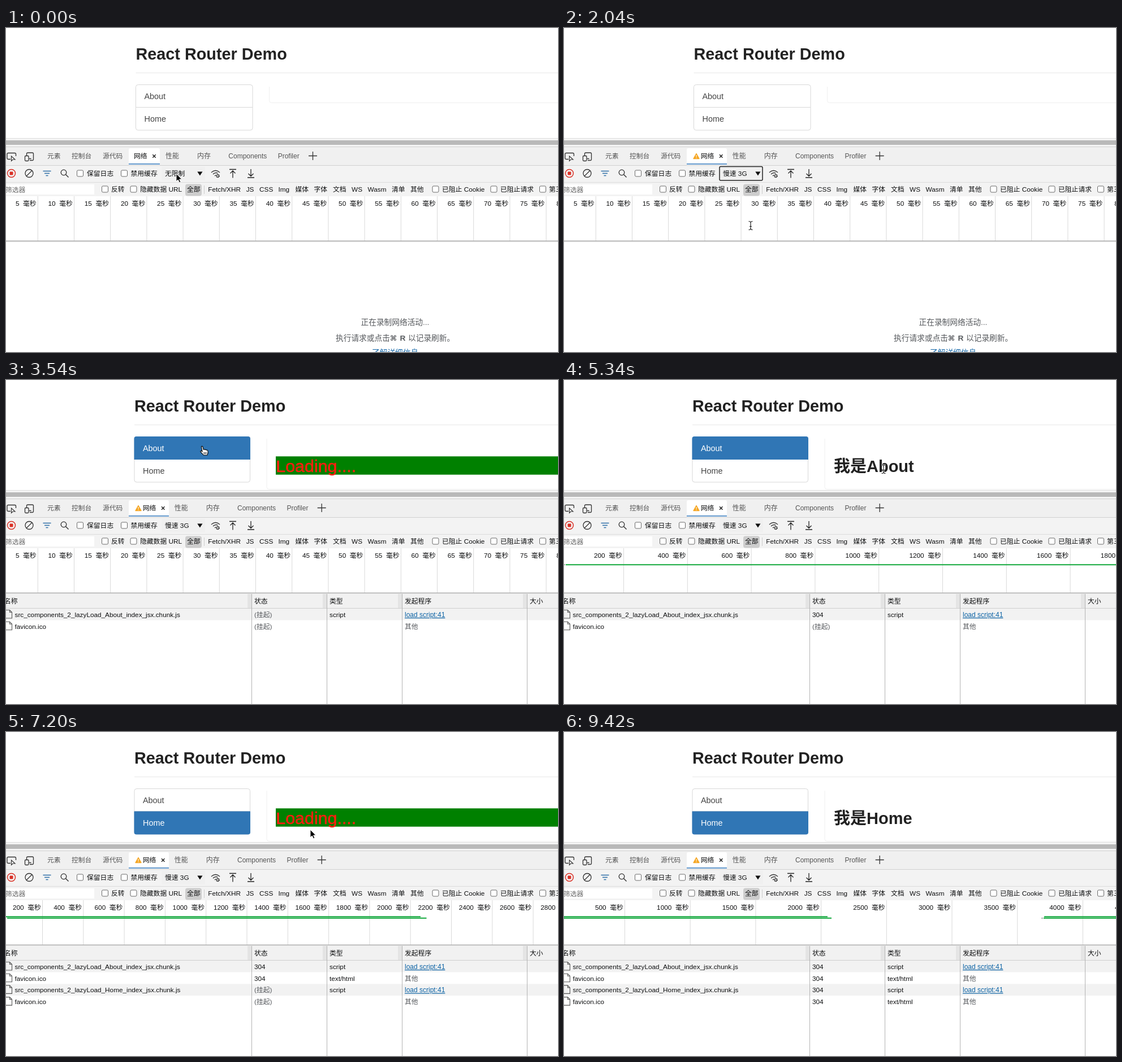
Animation, 976 px wide and 574 px high, one loop 9.48 s. Source, as an HTML page:

```html
<!DOCTYPE html>
<html lang="zh">
<head>
<meta charset="utf-8">
<title>React Router Demo</title>
<style>
html, body { margin: 0; width: 100%; height: 100%; overflow: hidden; background: #fff; }
svg { display: block; width: 976px; height: 574px; }
text { font-family: "Liberation Sans", "Noto Sans CJK SC", "Noto Sans CJK", sans-serif; white-space: pre; }
</style>
</head>
<body>
<svg id="stage" viewBox="0 0 976 574" xmlns="http://www.w3.org/2000/svg"></svg>
<script>
const LOOP = 9480, STEP = 60;
const T = {
  menu: 120, pick: 1680, about: 3060, aboutDone: 5100, icon1: 5400,
  home: 6780, icon2: 6840, homeDone: 8640, icon2Done: 8880
};
const stage = document.getElementById('stage');
const INK = '#0e0f10', GREY = '#55585c', BLUE = '#3076b5', GREEN = '#12a83c', FONT = 11.8;

function add(parent, tag, attrs, content) {
  const el = document.createElementNS('http://www.w3.org/2000/svg', tag);
  for (const k in attrs) el.setAttribute(k, attrs[k]);
  if (content !== undefined) el.textContent = content;
  parent.appendChild(el);
  return el;
}
const group = (parent = stage) => add(parent, 'g', {});
const rect = (p, x, y, width, height, fill, more) => add(p, 'rect', { x, y, width, height, fill, ...more });
const path = (p, d, stroke, w = 1, more) =>
  add(p, 'path', { d, stroke, 'stroke-width': w, fill: 'none', ...more });
const text = (p, x, y, s, size = FONT, fill = INK, more) =>
  add(p, 'text', { x, y, 'font-size': size, fill, ...more }, s);
const show = (el, on) => el.setAttribute('display', on ? 'inline' : 'none');
const BOLD = { 'font-weight': 700 };
const check = (p, x, y) => rect(p, x, y, 11, 11, '#fff', { rx: 2, stroke: '#6b6b6b' });

// Web page, in its plain and its slightly narrower layout
function page(x, w, panelX, panelEnd) {
  const g = group();
  text(g, x, 56, 'React Router Demo', 28.8, '#222', BOLD);
  path(g, `M${x} 79.5H976`, '#e8e8e8');
  path(g, `M${panelX} 104V${panelEnd - 4}q0 4 4 4H976`, '#efefef');
  rect(g, x, 100.5, w, 80.5, '#fff', { rx: 4, stroke: '#d8d8d8' });
  path(g, `M${x} 140.5h${w}`, '#d8d8d8');
  const r = x + w;
  const topShape = `M${x - .5} 141V104q0-4 4-4H${r - 3.5}q4 0 4 4V141z`;
  const lowShape = `M${x - .5} 140.5V177.5q0 4 4 4H${r - 3.5}q4 0 4-4V140.5z`;
  const hoverTop = path(g, topShape, '#d8d8d8', 1, { fill: '#f1f1f1' });
  const hoverLow = path(g, lowShape, '#d8d8d8', 1, { fill: '#f1f1f1' });
  const top = path(g, topShape, 'none', 0, { fill: BLUE });
  const low = path(g, lowShape, 'none', 0, { fill: BLUE });
  const a = text(g, x + 15, 126, 'About', 14.4);
  const h = text(g, x + 15, 166, 'Home', 14.4);
  return { g, top, low, a, h, hoverTop, hoverLow };
}
const before = page(229.5, 206.5, 465.5, 132.5);
const after = page(227, 204.5, 461, 193.5);

const loading = group();
rect(loading, 477, 135.3, 499, 32.4, '#008000');
text(loading, 477.3, 163, 'Loading....', 30.4, '#ff1d10', { stroke: '#ff1d10', 'stroke-width': .5 });
const aboutTitle = text(stage, 477, 163, '我是About', 29, '#222', BOLD);
const homeTitle = text(stage, 477, 163, '我是Home', 29, '#222', BOLD);

// Developer tools frame
const tools = group();
rect(tools, 0, 195, 976, 16, '#f4f4f4');
path(tools, 'M0 195.5H976', '#dedede');
rect(tools, 0, 199, 976, 8, '#b9b9b9');
rect(tools, 0, 210, 976, 33, '#f0f0f0');
path(tools, 'M0 210.5H976M0 243.5H976', '#d0d0d0');
rect(tools, 0, 244, 976, 54, '#f3f3f3');
path(tools, 'M0 273.5H976', '#dcdcdc');
path(tools, 'M8 232.5H4q-2 0-2-2V223.5q0-2 2-2H15.5q2 0 2 2V227', '#333', 1.3);
path(tools, 'M9.5 227v8.5l2.5-2.5h4z', '#333', 1.2, { fill: '#fff' });
path(tools, 'M36.5 226V223q0-2 2-2H46.5q2 0 2 2V233q0 1.5-1.5 1.5H42M41 231.5h3.5', '#333', 1.3);
rect(tools, 33.5, 226.5, 6.5, 9, '#f0f0f0', { rx: 1.5, stroke: '#333', 'stroke-width': 1.3 });
[[73, '元素'], [116, '控制台'], [171, '源代码']].forEach(([x, s]) => text(tools, x, 231, s, FONT, '#555'));

function tabs(width, warn) {
  const g = group(), dx = warn ? 15.7 : 0;
  path(g, `M217 243V216q0-3 3-3h${width - 6}q3 0 3 3V243z`, 'none', 0, { fill: '#fff' });
  rect(g, 217, 240.2, width, 1.5, '#2f76bb');
  if (warn) {
    path(g, 'M234 222.5L239 231.5H229z', '#f5a623', 1.4, { fill: '#f5a623', 'stroke-linejoin': 'round' });
    path(g, 'M234 225v3.5M234 229.5v1.2', '#fff', 1.1);
  }
  text(g, 226 + dx, 231, '网络', FONT, INK, { 'font-weight': 500 });
  path(g, `M${259.3 + dx} 224.3l5.4 5.4m0-5.4l-5.4 5.4`, '#222', 1.5);
  [[282, '性能'], [338, '内存'], [393.3, 'Components'], [480.7, 'Profiler']]
    .forEach(([x, s]) => text(g, x + dx, 231, s, FONT + .2, '#555'));
  path(g, `M${535 + dx} 226.5h15m-7.5-7.5v15`, '#333', 1.3);
  return g;
}
const plainTabs = tabs(55, false), warnTabs = tabs(71, true);

// Toolbar
const bar = group();
add(bar, 'circle', { cx: 9.5, cy: 257.5, r: 7, fill: 'none', stroke: '#d93025', 'stroke-width': 1.5 });
rect(bar, 6.5, 254.5, 6, 6, '#d93025', { rx: 1 });
add(bar, 'circle', { cx: 41, cy: 257.5, r: 7, fill: 'none', stroke: '#333', 'stroke-width': 1.3 });
path(bar, 'M36 262.5l10-10', '#333', 1.3);
path(bar, 'M65.5 253.5h14M68 257.5h9M70.5 261.5h4', '#2f6fa8', 1.4);
add(bar, 'circle', { cx: 102, cy: 256, r: 4.8, fill: 'none', stroke: '#333', 'stroke-width': 1.3 });
path(bar, 'M105.5 259.5l5 5', '#333', 1.4);
check(bar, 125.5, 252);
text(bar, 143, 262, '保留日志');
check(bar, 203.5, 252);
text(bar, 220.5, 262, '禁用缓存');
rect(bar, 275, 246, 77, 24, '#f0f0f0');
const focus = rect(bar, 275, 245.5, 76, 24.5, '#f0f0f0', { rx: 2, stroke: '#222', 'stroke-width': 1.5 });
const noLimit = text(bar, 281, 262, '无限制');
const slow = text(bar, 281, 262, '慢速 3G');
path(bar, 'M338.3 254.5h9.2l-4.6 7z', 'none', 0, { fill: '#111' });
path(bar, 'M363 256q7.5-7 15 0M366 259q4.5-4 8.5-1.5M369 262l2-1.5', '#333', 1.4);
add(bar, 'circle', { cx: 374.5, cy: 262, r: 2.3, fill: 'none', stroke: '#222', 'stroke-width': 2, 'stroke-dasharray': '1.6 .5' });
path(bar, 'M395 250.5h12M401 265.5V253m-4.5 4.5L401 253l4.5 4.5', '#222', 1.3);
path(bar, 'M427 265h12M433 250v12.5m-4.5-4.5l4.5 4.5l4.5-4.5', '#222', 1.3);

// Filter row
rect(bar, 0, 277, 156, 18, '#fff');
text(bar, -1, 290.5, '筛选器', FONT, '#6e6e6e');
[169.5, 220, 754, 857, 943.5].forEach(x => check(bar, x, 280));
rect(bar, 317, 276.5, 29, 21, '#cdcdcd', { rx: 4 });
path(bar, 'M350.5 279V294', '#ccc');
[[186, '反转'], [237, '隐藏数据 URL'], [320, '全部'], [357.3, 'Fetch/XHR'], [424.7, 'JS'], [448, 'CSS'],
 [481.5, 'Img'], [511.5, '媒体'], [544.5, '字体'], [578, '文档'], [611, 'WS'], [639.5, 'Wasm'], [682, '清单'],
 [715, '其他'], [771, '已阻止 Cookie'], [874, '已阻止请求'], [960, '第三方请求']]
  .forEach(([x, s]) => text(bar, x, 290, s));

// Timeline rulers
function ruler(first, gap, unit) {
  const g = group();
  rect(g, 0, 298, 976, 79, '#fff');
  for (let i = 1, x = first; x < 1040; i++, x += gap) {
    path(g, `M${x} 298V377`, '#d9d9d9');
    text(g, x - 2.7, 314.5, `${i * unit}\u00a0\u00a0毫秒`, FONT, INK, { 'text-anchor': 'end' });
  }
  return g;
}
const UPPER = 327.2, LOWER = 329.8;
const line = (g, x1, x2, y) => path(g, `M${x1} ${y}H${x2}`, GREEN, 2);
const rulers = [ruler(56.3, 64.2, 5), ruler(105.5, 112.8, 200), ruler(64.5, 72.3, 200), ruler(107.5, 115.7, 500)];
const oneBar = group(rulers[1]), twoBars = group(rulers[1]);
path(oneBar, `M0 ${UPPER}H2`, '#999', 1.5);
line(oneBar, 3, 976, UPPER);
path(twoBars, `M0 ${UPPER}H2M2 ${LOWER}H5`, '#999', 1.5);
line(twoBars, 5, 976, UPPER);
line(twoBars, 7, 976, LOWER);
line(rulers[2], 0, 733, UPPER);
line(rulers[2], 2, 743.5, LOWER);
line(rulers[3], 0, 466, UPPER);
line(rulers[3], 0, 473, LOWER);
path(rulers[3], `M844 ${LOWER}H847`, '#999', 1.5);
line(rulers[3], 849, 976, UPPER);
line(rulers[3], 848, 976, LOWER);
path(stage, 'M0 377.5H976', '#b5b5b5', 2);

// Empty log message
const empty = group();
text(empty, 627.5, 526, '正在录制网络活动...', 13.7, GREY);
text(empty, 583, 553.5, '执行请求或点击', 13.7, GREY);
text(empty, 679, 553.5, '⌘', 13, GREY, { ...BOLD, style: 'font-family:"DejaVu Sans",sans-serif' });
text(empty, 696.5, 553.5, 'R', 13.7, GREY, BOLD);
text(empty, 711, 553.5, '以记录刷新。', 13.7, GREY);
text(empty, 647, 580, '了解详细信息', 13.7, '#1769aa');

// Request table
const table = group();
rect(table, 0, 378.5, 976, 26, '#f1f1f1');
path(table, 'M0 404.5H976', '#cfcfcf');
const COLS = [434.5, 567.5, 700.5, 921.5];
COLS.forEach(x => rect(table, x - 7.5, 379, 7, 25, '#e4e4e4'));
[[-3, '名称'], [439, '状态'], [572, '类型'], [705, '发起程序'], [926, '大小']]
  .forEach(([x, s]) => text(table, x, 396, s));
function row(i, name, type, script) {
  const g = group(table), y = 405 + i * 20.7, base = y + 15;
  rect(g, 0, y, 976, 20.7, i % 2 ? '#fff' : '#f2f2f2');
  path(g, `M-2 ${y + 2.5}H6.5l4 4V${y + 17}H-2M6.5 ${y + 2.5}v4h4`, '#555', 1.1);
  text(g, 15.5, base, name, 11.78);
  const wait = text(g, 439, base, '(挂起)', FONT, GREY);
  const done = text(g, 439, base, '304');
  const kind = text(g, 572, base, type);
  if (script) text(g, 705, base, 'load script:41', 12, '#0b62a4', { 'text-decoration': 'underline' });
  else text(g, 705, base, '其他', FONT, GREY);
  return (seen, ready) => {
    show(g, seen);
    show(wait, !ready);
    show(done, ready);
    show(kind, script || ready);
  };
}
const chunk = name => `src_components_2_lazyLoad_${name}_index_jsx.chunk.js`;
const rows = [
  row(0, chunk('About'), 'script', true), row(1, 'favicon.ico', 'text/html', false),
  row(2, chunk('Home'), 'script', true), row(3, 'favicon.ico', 'text/html', false)
];
COLS.forEach(x => path(table, `M${x} 379V574`, '#b4b4b4'));

// Link bubble
const bubble = group();
rect(bubble, -10, 188, 139, 22, '#000', { rx: 5, opacity: .04 });
rect(bubble, -10, 189.5, 132.5, 20.5, '#e3e3e3', { rx: 4, stroke: '#d2d2d2' });
const link = text(bubble, 115, 204, '', 12.6, '#666', { 'text-anchor': 'end' });

// Speed menu
const menu = group(), ITEM = 20.6, MENU_Y = 250;
rect(menu, 258.5, 245.5, 99, 175, '#f1f1f1', { rx: 5, stroke: '#c6c6c6' });
const glow = rect(menu, 262, 0, 92, ITEM, '#3478f6', { rx: 4 });
const labels = ['已停用', '无限制', '预设', '快速 3G', '慢速 3G', '离线', '自定义', '添加…'];
const heads = [0, 2, 6];
const items = labels.map((s, i) => text(menu, 281, MENU_Y + i * ITEM + 14.5, s));
path(menu, `M267 ${MENU_Y + ITEM + 10}l3 3.5l5-7`, INK, 1.4);

// Pointers, each with its hot spot at 0,0
const arrow = path(stage, 'M0 0V13.8L3.2 10.9L5.5 15.8L7.8 14.7L5.600 10H9.8z', '#fff', 1, { fill: '#000' });
const hand = group();
path(hand, 'M.4 1.2Q1.6-.4 2.9 1.2L4.2 6.3Q5.6 5.2 6.7 6.6Q8.3 5.7 9.3 7.2Q11.3 6.6 11.9 8.6Q12.7 11.5 11.3 14.5L10.9 16H4.3Q2.3 13.5-.8 10.6Q-1.8 8.6.3 8.6L2 9.8z', '#000', 1.1, { fill: '#fff' });
path(hand, 'M5 11v3M7 11v3M9 11v3', '#000', .9);
const beam = group();
const beamShape = 'M-3.5-7.5Q0-7.5 0-5Q0-7.5 3.5-7.5M0-5V5M-3.5 7.5Q0 7.5 0 5Q0 7.5 3.5 7.5M-2 1.5H2';
path(beam, beamShape, '#fff', 2.6);
path(beam, beamShape, '#222', 1.2);

const MOVES = [
  [0, 301, 258], [360, 303, 262], [600, 303, 262], [1440, 330, 346], [1980, 330, 350], [2040, 330, 350],
  [2940, 345, 117], [3900, 345, 117], [4860, 565, 158], [5820, 565, 158], [6600, 297, 164],
  [6780, 297, 164], [7200, 538, 173], [7680, 995, 200]
];
function pointer(t) {
  const i = MOVES.findIndex(m => m[0] > t);
  if (i < 0) return MOVES[MOVES.length - 1].slice(1);
  const [t0, x0, y0] = MOVES[i - 1], [t1, x1, y1] = MOVES[i];
  const u = (t - t0) / (t1 - t0), e = u * u * (3 - 2 * u);
  return [x0 + (x1 - x0) * e, y0 + (y1 - y0) * e];
}

function render(t) {
  const [x, y] = pointer(t);
  const menuOn = t >= T.menu && t < T.pick, picked = t >= T.pick;
  const started = t >= T.about, onHome = t >= T.home;
  const overList = x > 227 && x < 436 && y > 100 && y < 181;
  const overTop = overList && y < 141, overLow = overList && !overTop;

  show(before.g, !started);
  show(after.g, started);
  for (const p of [before, after]) {
    const a = started && !onHome;
    show(p.top, a);
    show(p.low, onHome);
    show(p.hoverTop, overTop && !a);
    show(p.hoverLow, overLow && !onHome);
    p.a.setAttribute('fill', a ? '#fff' : '#444');
    p.h.setAttribute('fill', onHome ? '#fff' : '#444');
  }
  show(loading, started && t < T.aboutDone || onHome && t < T.homeDone);
  show(aboutTitle, t >= T.aboutDone && !onHome);
  show(homeTitle, t >= T.homeDone);

  show(plainTabs, !picked);
  show(warnTabs, picked);
  show(focus, t >= T.menu && !started);
  show(noLimit, !picked);
  show(slow, picked);

  const scale = t >= T.homeDone ? 3 : t >= T.icon2 ? 2 : t >= T.aboutDone ? 1 : 0;
  rulers.forEach((g, i) => show(g, i === scale));
  show(oneBar, t < T.icon1);
  show(twoBars, t >= T.icon1);

  show(empty, !started);
  show(table, started);
  rows[0](started, t >= T.aboutDone);
  rows[1](started, t >= T.icon1);
  rows[2](onHome, t >= T.homeDone);
  rows[3](t >= T.icon2, t >= T.icon2Done);

  show(bubble, overTop && t >= 2940 && !started || overLow && !onHome);
  link.textContent = 'localhost:3000/' + (overTop ? 'about' : 'home');

  show(menu, menuOn);
  const at = Math.floor((y - MENU_Y) / ITEM), lit = heads.includes(at) ? -1 : at;
  show(glow, lit >= 0 && menuOn);
  glow.setAttribute('y', MENU_Y + lit * ITEM);
  items.forEach((el, i) => el.setAttribute('fill', i === lit ? '#fff' : heads.includes(i) ? '#a0a0a0' : INK));

  const overText = y > 298 && y < 377 || x > 477 && x < 620 && y > 136 && y < 168;
  const shape = overList ? hand : overText && !menuOn ? beam : arrow;
  for (const el of [arrow, hand, beam]) show(el, el === shape);
  shape.setAttribute('transform', `translate(${x.toFixed(1)} ${y.toFixed(1)})`);
}

const start = performance.now();
function tick() {
  const t = (performance.now() - start) % LOOP;
  render(Math.floor(t / STEP) * STEP);
  requestAnimationFrame(tick);
}
tick();
</script>
</body>
</html>
```
